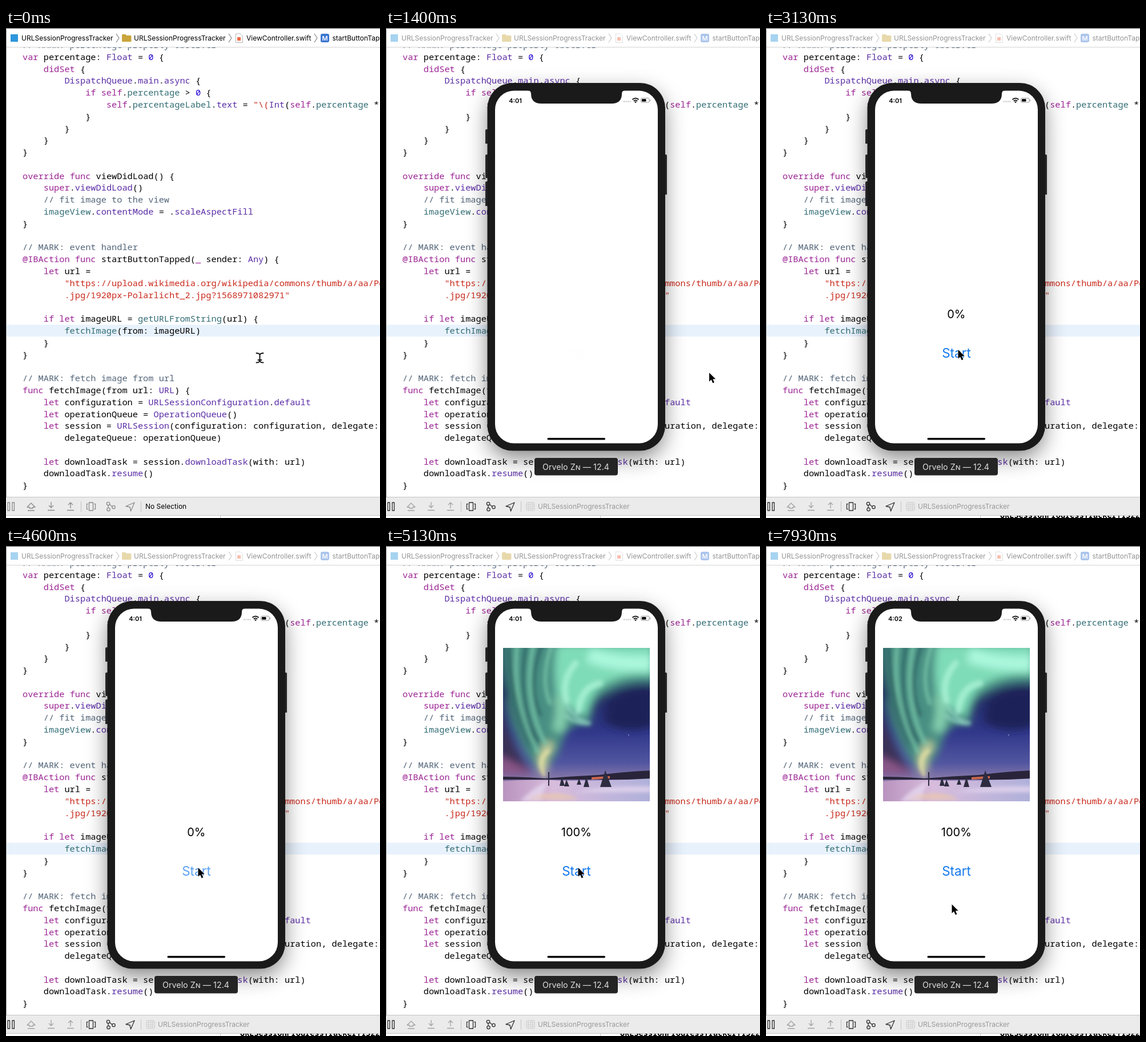
These frames come from a looping animation (655 px wide and 856 px high, 8000 ms). An HTML page:

```html
<!DOCTYPE html>
<html lang="en">
<head>
<meta charset="utf-8">
<title>Download progress demo</title>
<style>
  html, body { margin: 0; width: 100%; height: 100%; overflow: hidden; background: #fff; }
  svg { display: block; width: 655px; height: 856px; }
  text { font-family: Inter, "Open Sans", "Noto Sans", sans-serif; font-size: 12px; white-space: pre; }
  #code text, #log { font-family: "Noto Sans Mono", "DejaVu Sans Mono", monospace; font-size: 15.3px; }
  #log { font-size: 13.6px; font-weight: 700; }
  .comment { fill: #536579; }
  .string { fill: #c92a1c; }
  .keyword { fill: #9b2393; }
  .number { fill: #1c00cf; }
  .own { fill: #326d74; }
  .type { fill: #5a2ca5; }
  .line { fill: none; stroke: #8a8a8a; stroke-width: 1.3; stroke-linejoin: round; }
  .running .line { stroke: #a2a2a2; }
  .running .on { stroke: #303030; }
  .mid { text-anchor: middle; }
</style>
</head>
<body>
<svg viewBox="0 0 655 856">
  <defs>
    <filter id="soft" x="-30%" y="-30%" width="160%" height="160%"><feGaussianBlur stdDeviation="7"/></filter>
    <filter id="fine" x="-30%" y="-30%" width="160%" height="160%"><feGaussianBlur stdDeviation="3"/></filter>
    <filter id="shade" x="-40%" y="-20%" width="180%" height="140%"><feGaussianBlur stdDeviation="19"/></filter>
    <linearGradient id="sky" x1="0" y1="0" x2="0" y2="1">
      <stop offset="0" stop-color="#2c5f70"/><stop offset=".3" stop-color="#20275e"/>
      <stop offset=".55" stop-color="#31388a"/><stop offset=".75" stop-color="#5256a0"/>
      <stop offset=".84" stop-color="#8074a8"/>
    </linearGradient>
    <linearGradient id="snow" x1="0" y1="0" x2="1" y2="0">
      <stop offset="0" stop-color="#b791bd"/><stop offset=".35" stop-color="#d8bcdc"/><stop offset="1" stop-color="#aeb0da"/>
    </linearGradient>
    <clipPath id="photoBox"><rect x="205" y="178" width="257" height="268"/></clipPath>
    <clipPath id="logBox"><rect x="376" y="852" width="279" height="4"/></clipPath>
  </defs>

  <rect width="655" height="856" fill="#fff"/>
  <rect y="518.5" width="655" height="20.5" fill="#e8f2fd"/>
  <g id="code"></g>
  <rect id="caret" x="341.5" y="519" width="1.5" height="20"/>

  <rect width="655" height="33" fill="#fff"/>
  <path d="M0 33.5H655" stroke="#d4d4d4"/>
  <g id="header">
    <rect x="8" y="11" width="13" height="13" fill="#2e97dc"/>
    <path d="M203 12.5q0-1.5 1.5-1.5h5l1.5 2h7q1.5 0 1.5 1.5v8q0 1.5-1.5 1.5h-13.5q-1.5 0-1.5-1.5z" fill="#c9a53c"/>
    <path d="M402.5 10h8l4 4v11.5h-12z" fill="#fff" stroke="#b5b5b5"/>
    <rect x="405" y="16" width="6" height="6" fill="#ee6a45"/>
    <rect x="551" y="10" width="15" height="15" rx="3" fill="#3c76d2"/>
    <text class="mid" x="558.5" y="21.5" fill="#fff" font-weight="600" style="font-size:11px">M</text>
    <path class="line" d="M193 10l5 7.5-5 7.5M390 10l5 7.5-5 7.5M540 10l5 7.5-5 7.5"/>
    <text x="27" y="22">URLSessionProgressTracker</text>
    <text x="224" y="22">URLSessionProgressTracker</text>
    <text x="421" y="22">ViewController.swift</text>
    <text x="571.5" y="22">startButtonTapped</text>
  </g>

  <g id="bar">
    <rect y="820" width="655" height="31" fill="#ebebeb"/>
    <path d="M0 819.5H655M0 851.5H655" stroke="#c6c6c6"/>
    <path d="M131.5 827v18M236.5 827v18M375.5 852v4" stroke="#c2c2c2"/>
    <path class="line on" d="M3 829h3.5v14H3zM11 829h3.5v14H11z"/>
    <path class="line" d="M37 837l7-7 7 7h-4v2h-6v-2zM38 843h12M79 828v9M75 834l4 4 4-4M73 842.5h12M113 839v-10M109 833l4-4 4 4M107 842.5h12"/>
    <path class="line on" d="M145.5 829h7v14h-7zM143.5 831.5h-2v9h2M154.5 831.5h2v9h-2M181 832l5 4M179 834v4"/>
    <circle class="line on" cx="179" cy="831" r="2.7"/>
    <circle class="line on" cx="188.5" cy="837" r="2.7"/>
    <circle class="line on" cx="179.5" cy="841" r="2.7"/>
    <path class="line on" d="M225 829l-15 6.5 7 1.5 1.5 7z"/>
    <text id="idle" x="244" y="840">No Selection</text>
    <g id="target">
      <rect x="246" y="829" width="14" height="14" rx="2" fill="none" stroke="#bbb" stroke-dasharray="2 1"/>
      <path d="M249.5 829v14M253 829v14M256.5 829v14M246 832.5h14M246 836h14M246 839.5h14" stroke="#ccc" stroke-width=".8"/>
      <text x="266" y="840" fill="#999">URLSessionProgressTracker</text>
    </g>
  </g>
  <g clip-path="url(#logBox)"><text id="log" x="410" y="856">URLSessionProgressTracker[1322</text></g>
  <path d="M0 .5H655" stroke="#444"/>
  <path d="M.5 0V820" stroke="#9a9a9a"/>

  <g id="phone">
    <rect x="180" y="112" width="306" height="638" rx="42" opacity=".5" filter="url(#shade)"/>
    <path d="M174 179q0-2 2-2h4v25h-6zM174 223q0-2 2-2h4v41h-6zM174 270q0-2 2-2h4v43h-6zM486 221h4q2 0 2 2v68h-6z" fill="#252527"/>
    <rect x="177.5" y="96" width="311.5" height="642.5" rx="44" fill="#1a1a1a"/>
    <rect x="191" y="109.5" width="285" height="616" rx="33" fill="#fff"/>
    <path d="M248 109h171q-6 0-6 6q0 17-18 17H272q-18 0-18-17q0-6-6-6z" fill="#1a1a1a"/>
    <text id="clock" class="mid" x="226.5" y="130.5" font-weight="600" style="font-size:11px"></text>
    <path d="M416 128.500h13" stroke="#bbb" stroke-width="2" stroke-dasharray="2 1.5"/>
    <path d="M431.5 125q5.5-4.8 11 0M433.8 127.5q3.2-2.8 6.4 0" fill="none" stroke="#000" stroke-width="1.7"/>
    <path d="M435 129l2 2 2-2q-2-1.500-4 0z"/>
    <rect x="446.5" y="122.500" width="14.5" height="7.5" rx="2" fill="none" stroke="#999"/>
    <rect x="448" y="124" width="7.5" height="4.5" rx="1"/><path d="M462.5 125v3" stroke="#999"/>
    <rect x="282.5" y="716" width="101.5" height="3.5" rx="1.7"/>

    <g id="photo" clip-path="url(#photoBox)">
      <rect x="205" y="178" width="257" height="268" fill="url(#sky)"/>
      <g filter="url(#soft)">
        <path d="M195 250q15 90 62 150h-62z" fill="#3b3157"/>
        <path d="M195 365q30 12 65 35h-65z" fill="#8a5688"/>
        <path d="M210 168h260v72q-50-4-85 20q-22 8-28 52q-28-8-46 22q-12 44-40 62q-45-50-61-120z" fill="#488f83"/>
        <path d="M300 172h170v54q-60-6-96 22q-18 16-24 50q-20-16-46-20q-14-50-4-106z" fill="#7fdcb8"/>
        <path d="M355 190q50 18 110 14" fill="none" stroke="#aaf7dd" stroke-width="26"/>
        <path d="M304 262q8 30-4 62" fill="none" stroke="#84cfae" stroke-width="20"/>
        <path d="M205 170q0 90 52 180" fill="none" stroke="#34696a" stroke-width="14"/>
        <path d="M290 345q-24 22-12 50" fill="none" stroke="#c4cf9c" stroke-width="15"/>
        <path d="M392 268q34-26 80-20v64q-45 20-90-4z" fill="#1d2058"/>
      </g>
      <g filter="url(#fine)" fill="none" stroke-linecap="round">
        <path d="M215 180q2 90 42 155M246 170q-18 100 20 170M274 170q-28 70-4 125" stroke="#275f62" stroke-width="6" opacity=".7"/>
        <path d="M230 170q-12 100 36 190M259 170q-22 95 20 175M291 170q-22 60-4 105" stroke="#7fcfae" stroke-width="6" opacity=".75"/>
        <path d="M375 240q-34 6-38 48M332 205q-26 30-16 65" stroke="#b0f5da" stroke-width="11" opacity=".7"/>
        <path d="M318 280q12 22 40 30q-24 2-44-14" stroke="#8ed3c0" stroke-width="6" opacity=".8"/>
        <path d="M284 358q-20 15-7 42" stroke="#e9e3a5" stroke-width="7" opacity=".8"/>
      </g>
      <path d="M200 403q38 0 78 3q50-4 95-6q45-6 95-8v16H200z" fill="#292439"/>
      <path d="M200 411q60-4 110-1q80 0 155-4v45H200z" fill="url(#snow)"/>
      <g filter="url(#fine)">
        <path d="M235 446q20-22 46-34l3 1q-12 18-12 33zM330 430q60-12 135-10v10z" fill="#e6d8ef" opacity=".8"/>
        <path d="M247 441q30-10 55-8t34 10z" fill="#edc9a8" opacity=".75"/>
      </g>
      <path d="M360 404l32-2v4l-32 2z" fill="#d06a50"/>
      <path d="M284 395h2v24h-2zM304 419l4-16 5 16zM312 420l4-12 5 12zM334 417l4-11 4 11zM346 421l5-18 5 18zM375 421l9-29 11 29z" fill="#2d2c40"/>
      <circle cx="425" cy="330" r=".8" fill="#d8e5ff"/>
    </g>
    <g id="controls">
      <text id="percent" class="mid" x="333.3" y="506.5" style="font-size:20px"></text>
      <text id="start" class="mid" x="333.5" y="576" fill="#1278ec" style="font-size:22.5px">Start</text>
    </g>
    <rect x="260" y="751" width="146" height="30.5" rx="4" fill="#242424"/>
    <text class="mid" x="332.5" y="772" fill="#dedede" style="font-size:14.3px">Orvelo Zɴ — 12.4</text>
  </g>

  <path id="beam" transform="translate(444.5 576)" d="M-6-8q5 0 6 3q1-3 6-3M0-5V6M-6 8.5q5 0 6-3q1 3 6 3M-3 4H3"
    fill="none" stroke="#111" stroke-width="2" stroke-linecap="round"/>
  <path id="arrow" d="M0 0v15.5l3.6-3.3 2.6 6 2.7-1.1-2.6-5.9h4.9z" stroke="#fff" paint-order="stroke"/>
</svg>

<script>
const $ = id => document.getElementById(id);

const source = String.raw`// MARK: percentage property observer
var percentage: Float = 0 {
    didSet {
        DispatchQueue.main.async {
            if self.percentage > 0 {
                self.percentageLabel.text = "\(Int(self.percentage * 100))%"
            }
        }
    }
}

override func viewDidLoad() {
    super.viewDidLoad()
    // fit image to the view
    imageView.contentMode = .scaleAspectFill
}

// MARK: event handler
@IBAction func startButtonTapped(_ sender: Any) {
    let url =
        "https://upload.wikimedia.org/wikipedia/commons/thumb/a/aa/Polarlicht_2
        .jpg/1920px-Polarlicht_2.jpg?1568971082971"

    if let imageURL = getURLFromString(url) {
        fetchImage(from: imageURL)
    }
}

// MARK: fetch image from url
func fetchImage(from url: URL) {
    let configuration = URLSessionConfiguration.default
    let operationQueue = OperationQueue()
    let session = URLSession(configuration: configuration, delegate: self,
        delegateQueue: operationQueue)

    let downloadTask = session.downloadTask(with: url)
    downloadTask.resume()
}`;

const syntax = new RegExp([
  String.raw`(?<comment>\/\/ .*)`,
  String.raw`(?<string>"\\\(|"https\S*|\.jpg\S*)`,
  String.raw`(?<keyword>@IBAction|\b(?:var|didSet|if|self|override|func|super|let|_)\b)`,
  String.raw`(?<own>(?<=\.)percentage(?:Label)?|imageView|getURLFromString|fetchImage(?=\(from:))`,
  String.raw`(?<type>\b(?:Float|DispatchQueue|main|async|Int|text|contentMode|scaleAspectFill|Any|URLSession\w*|URL|default|OperationQueue|resume)\b|(?<=\.)downloadTask|(?<=super\.)viewDidLoad)`,
  String.raw`(?<number>\b0\b)`
].join("|"), "g");

function paint(line) {
  return line.replace(syntax, (word, ...rest) => {
    const groups = rest.at(-1);
    const kind = Object.keys(groups).find(key => groups[key]);
    return `<tspan class="${kind}">${word}</tspan>`;
  });
}

$("code").innerHTML = source.split("\n").map((line, i) =>
  `<text x="29" y="${55.8 + (i - 1) * 20.79}">${paint(line)}</text>`).join("");

// Pointer path: time, x, y
const path = [
  [270, 411, 571.5], [800, 411, 571.5], [870, 480, 533], [940, 565, 590], [1000, 633, 650],
  [1270, 633, 650], [1730, 398, 482], [1870, 390.5, 488.5], [2530, 390.5, 488.5],
  [2680, 397, 483], [3130, 336.5, 562], [5900, 336.5, 562], [6000, 321.5, 578],
  [6170, 321.5, 578], [6400, 325.5, 573], [7180, 325.5, 573], [7530, 325.5, 626], [8000, 325.5, 626]
];

const ramp = (t, from, to) => Math.min(1, Math.max(0, (t - from) / (to - from)));

function pointer(t) {
  const next = Math.max(1, path.findIndex(p => p[0] > t));
  const [t0, x0, y0] = path[next - 1], [t1, x1, y1] = path[next];
  const u = ramp(t, t0, t1);
  return [x0 + (x1 - x0) * u, y0 + (y1 - y0) * u];
}

// A touched button dims at once and eases back after release
function press(t, down, up, end) {
  return t < down ? 1 : 1 - 0.8 * (1 - ramp(t, up, end)) ** 2;
}

const show = (id, on) => $(id).style.display = on ? "" : "none";

function draw() {
  const t = performance.now() % 8000;
  const running = t >= 270;
  show("phone", running);
  show("arrow", running);
  show("target", running);
  show("idle", !running);
  show("beam", !running);
  show("caret", t >= 70 && !running);
  show("log", t >= 1600);
  show("photo", t >= 5100);
  $("bar").setAttribute("class", running ? "running" : "");
  $("header").style.opacity = running ? 0.42 : 1;
  $("controls").style.opacity = ramp(t, 1400, 1600);
  $("start").style.opacity = Math.min(press(t, 4330, 4400, 4930), press(t, 6860, 7000, 7530));
  $("percent").textContent = t < 5070 ? "0%" : "100%";
  $("clock").textContent = t < 7200 ? "4:01" : "4:02";
  $("arrow").setAttribute("transform", `translate(${pointer(t)})`);
  requestAnimationFrame(draw);
}
draw();
</script>
</body>
</html>
```
